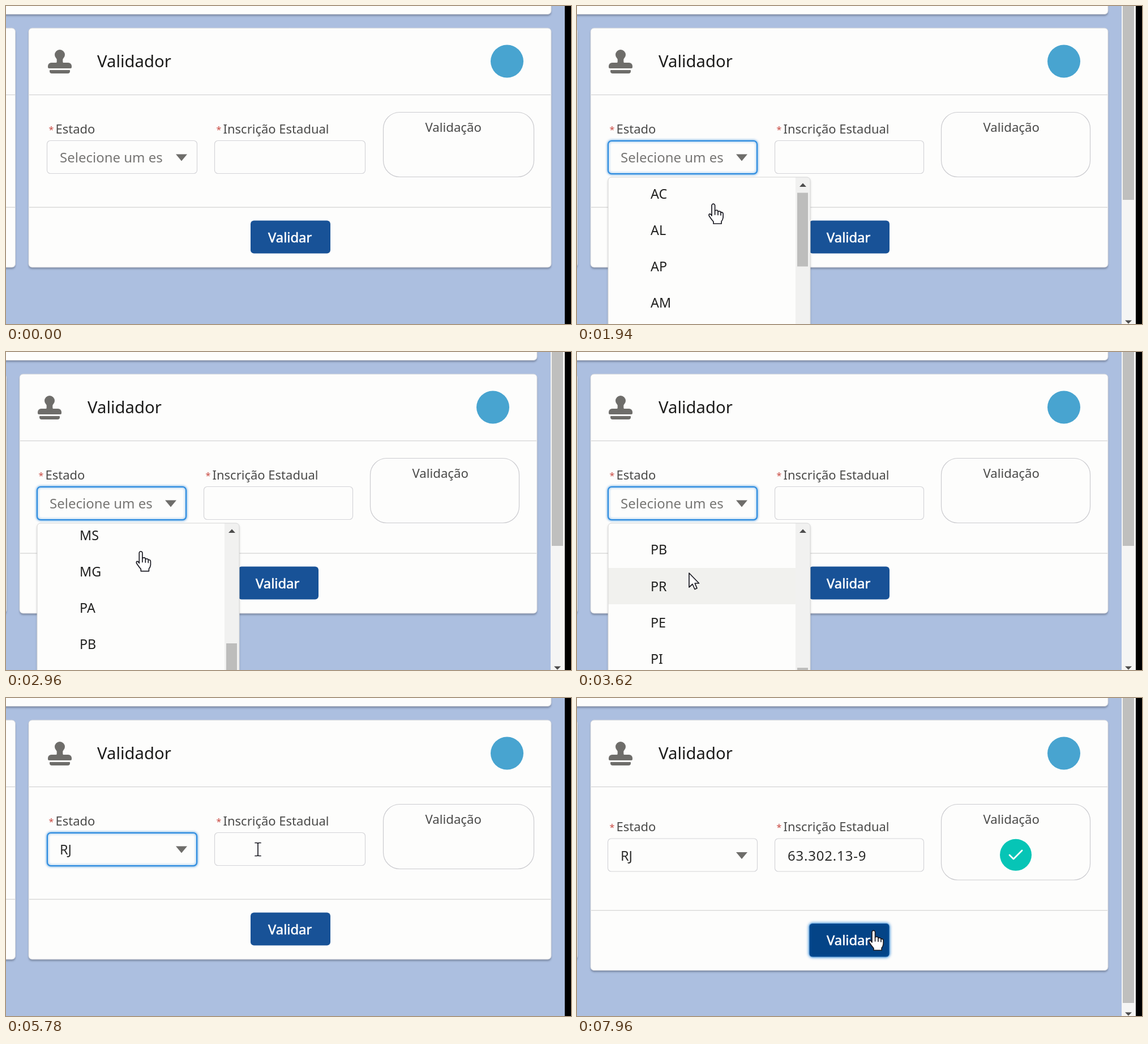
Write an HTML page with a canvas that moves like this. It is 998 by 561 pixels and loops after 8 s.

```html
<!DOCTYPE html>
<html lang="pt-BR">
<head>
<meta charset="utf-8">
<title>Validador</title>
<style>
  html, body { margin: 0; width: 100%; height: 100%; overflow: hidden; background: #acbfe0; }
  canvas { display: block; width: 100vw; height: 100vh; }
</style>
</head>
<body>
<canvas id="stage" width="998" height="561"></canvas>
<script>
const ctx = document.getElementById('stage').getContext('2d');
const W = 998, H = 561, LOOP = 8000;
const FONT = '"Noto Sans", "Open Sans", sans-serif';
const CARD = '#fdfdfc', GREY = '#6e6d6a', LINE = '#d6d6d6', BORDER = '#d4d4d8';

// Moments of the interaction, in ms
const FOCUS = 1400, OPEN = 1560, PICK = 5150, FOCUS_ID = 5950, PASTE = 6300, PRESS = 7150, RESULT = 7250;

const STATES = ('AC AL AP AM BA CE DF ES GO MA MT MS MG PA PB PR PE PI ' +
  'RJ RN RS RO RR SC SP SE TO').split(' ');
const ROW = 64.1, FIRST_ROW = 341;

const wide = { left: 40, right: 963, side: 16.5, icon: 95, title: 161, logo: 885,
  state: [72, 338], id: [368, 635], pill: [666, 933], button: [432, 573] };
const narrow = { left: 24, right: 938, side: 0.8, icon: 77, title: 144, logo: 860,
  state: [54, 319], id: [349, 613], pill: [643, 907], button: [410, 552] };

const MOUSE = [[900, 300, 600], [1300, 255, 272], [1650, 255, 272], [1900, 241, 349],
  [2900, 241, 349], [3300, 198, 390], [3750, 198, 390], [4300, 160, 338], [4800, 160, 338],
  [5000, 160, 326], [5200, 160, 326], [5700, 445, 267], [6700, 445, 267], [7050, 524, 410]];
const SCROLL = [[1920, 0], [2070, 181], [2110, 181], [2240, 362], [2265, 362], [2390, 542],
  [2800, 542], [2960, 723], [3100, 723], [3280, 889.5], [3900, 889.5], [4060, 1050],
  [4150, 1050], [4320, 1186]];

function track(keys, t, part) {
  if (t <= keys[0][0]) return keys[0][part];
  for (let i = 1; i < keys.length; i++) {
    const a = keys[i - 1], b = keys[i];
    if (t < b[0]) {
      const u = (t - a[0]) / (b[0] - a[0]);
      return a[part] + (b[part] - a[part]) * u * u * (3 - 2 * u);
    }
  }
  return keys[keys.length - 1][part];
}

function rect(x, y, w, h, color) {
  ctx.fillStyle = color;
  ctx.fillRect(x, y, w, h);
}

function box(x1, y1, x2, y2, r, fill, stroke, width = 1.2) {
  ctx.beginPath();
  ctx.roundRect(x1, y1, x2 - x1, y2 - y1, r);
  if (fill) { ctx.fillStyle = fill; ctx.fill(); }
  if (stroke) { ctx.strokeStyle = stroke; ctx.lineWidth = width; ctx.stroke(); }
}

function text(str, x, y, size, color) {
  ctx.font = `${size}px ${FONT}`;
  ctx.fillStyle = color;
  ctx.fillText(str, x, y);
}

function circle(x, y, r, color) {
  ctx.beginPath();
  ctx.arc(x, y, r, 0, Math.PI * 2);
  ctx.fillStyle = color;
  ctx.fill();
}

function shape(points, fill) {
  ctx.beginPath();
  points.forEach(([x, y]) => ctx.lineTo(x, y));
  ctx.closePath();
  ctx.fillStyle = fill;
  ctx.fill();
}

function withShadow(color, blur, dy, draw) {
  ctx.save();
  ctx.shadowColor = color;
  ctx.shadowBlur = blur;
  ctx.shadowOffsetY = dy;
  draw();
  ctx.restore();
}

function card(x1, y1, x2, y2) {
  withShadow('rgba(70,80,100,.45)', 3, 3, () => box(x1, y1, x2, y2, 6, CARD));
  box(x1, y1, x2, y2, 6, null, '#d3d5da', 1);
}

function stamp(x) {
  ctx.save();
  ctx.translate(x, 0);
  circle(0, 86, 9, GREY);
  ctx.beginPath();
  ctx.moveTo(-7, 90);
  ctx.quadraticCurveTo(-4, 95, -6, 101);
  ctx.lineTo(6, 101);
  ctx.quadraticCurveTo(4, 95, 7, 90);
  ctx.fill();
  box(-21, 100, 21, 110, [6, 6, 2, 2], GREY);
  box(-18, 113, 18, 119, [1, 1, 4, 4], GREY);
  ctx.restore();
}

function label(str, x, y) {
  text('*', x + 3.5, y - 1, 16, '#c94a42');
  text(str, x + 15.5, y, 22, '#4a4a49');
}

function field([x1, x2], y, focused) {
  if (focused) {
    withShadow('rgba(0,112,210,.7)', 4, 0, () => box(x1 + 1, y + 1, x2 - 1, y + 59, 6, CARD, '#2b8be0', 2));
  } else {
    box(x1 + .5, y + .5, x2 - .5, y + 58.5, 6, CARD, BORDER);
  }
}

function stateField(L, y, t) {
  const [x1, x2] = L.state, arrow = x2 - 28;
  field(L.state, y, t >= FOCUS && t < FOCUS_ID);
  ctx.save();
  ctx.beginPath();
  ctx.rect(x1, y, x2 - 61 - x1, 59);
  ctx.clip();
  if (t < PICK) text('Selecione um estado', x1 + 23, y + 39, 24, '#777674');
  else text('RJ', x1 + 23, y + 39, 23.5, '#2b2b2a');
  ctx.restore();
  shape([[arrow - 10, y + 24.5], [arrow + 10, y + 24.5], [arrow, y + 36.5]], GREY);
}

function idField(L, y, t) {
  field(L.id, y, t >= FOCUS_ID && t < PRESS);
  if (t < PASTE) return;
  ctx.letterSpacing = '0.8px';
  text('63.302.13-9', L.id[0] + 23, y + 39, 24, '#2b2b2a');
  ctx.letterSpacing = '0px';
}

function validation([x1, x2], grow, done) {
  box(x1 + .5, 187.5, x2 - .5, 301.5 + grow, 29, null, '#cbcbcf');
  text('Validação', x1 + 74.5, 222, 22.2, '#4a4a49');
  if (!done) return;
  const x = (x1 + x2) / 2;
  circle(x, 276.8, 28, '#06c5b6');
  ctx.beginPath();
  ctx.moveTo(x - 11, 277);
  ctx.lineTo(x - 4, 284);
  ctx.lineTo(x + 11, 269);
  ctx.strokeStyle = '#fff';
  ctx.lineWidth = 2.8;
  ctx.lineCap = ctx.lineJoin = 'round';
  ctx.stroke();
}

function button([x1, x2], y, hover, focused) {
  const fill = hover ? '#044487' : '#185297';
  if (focused) {
    withShadow('rgba(0,112,210,.8)', 5, 0, () => box(x1, y - .5, x2, y + 59, 6, fill, '#78aee0', 1));
  } else {
    box(x1, y, x2, y + 58, 6, fill);
  }
  text('Validar', x1 + 31, y + 38, 23.8, '#fff');
  ctx.strokeStyle = '#fff';
  ctx.lineWidth = .6;
  ctx.strokeText('Validar', x1 + 31, y + 38);
}

function list(t, mouseY) {
  const s = track(SCROLL, t, 1), moving = s !== track(SCROLL, t - 60, 1);
  withShadow('rgba(0,0,0,.2)', 4, 2, () => box(55, 302, 412, 640, 6, CARD));
  ctx.save();
  ctx.beginPath();
  ctx.roundRect(55, 302, 357, 340, 6);
  ctx.clip();
  STATES.forEach((name, i) => {
    const y = FIRST_ROW + ROW * i - s, top = y - ROW / 2;
    if (y < 260 || y > 600) return;
    const over = mouseY + 4 >= top && mouseY + 4 < top + ROW;
    if (over && !moving) rect(55, top, 331, ROW, '#f1f1ee');
    text(name, 130, y + 8.5, 23.3, '#1f1f1e');
  });
  rect(386, 302, 26, 340, '#f1f1f0');
  rect(389, 327 + s * .2586, 19, 130, '#bdbdbc');
  shape([[393, 319], [405, 319], [399, 312.5]], '#4c4c4c');
  ctx.restore();
  box(55, 302, 412, 640, 6, null, '#d8d8d8', 1);
}

function pageScrollbar(end) {
  rect(962, 0, 25, H, '#f5f5f4');
  rect(964, 0, 20, end, '#bfbfbe');
  shape([[968, 554.5], [980, 554.5], [974, 560.5]], '#4c4c4c');
}

const HAND = new Path2D('M-3 21V3a2.8 2.8 0 0 1 5.6 0V12q5-2 5.5 1.5q4.500-1 5 1.500q4-.5 4 3' +
  'V24q-.5 4-3 7V35H0V31.500Q-4 27-7.500 21.500C-9.500 17-5 16.500-3 21Z');
const FINGERS = new Path2D('M2.600 12V19M8 13.500V19.500M13 15V20');
const ARROW = new Path2D('M0 0V25L6 19.500L10 28.500L14 26.800L10.200 18H17.500Z');
const BEAM = new Path2D('M-5-11.500H-1.500L0-10.500L1.500-11.500H5M0-10.500V10.500M-5 11.500H-1.500L0 10.500L1.500 11.500H5');

function cursor(kind, x, y) {
  ctx.save();
  ctx.translate(x, y);
  ctx.lineJoin = ctx.lineCap = 'round';
  ctx.strokeStyle = '#1c1c24';
  ctx.lineWidth = 1.7;
  if (kind === 'beam') {
    ctx.stroke(BEAM);
  } else {
    const path = kind === 'hand' ? HAND : ARROW;
    ctx.fillStyle = '#fff';
    ctx.fill(path);
    ctx.stroke(path);
    if (kind === 'hand') ctx.stroke(FINGERS);
  }
  ctx.restore();
}

const inside = (x, y, [x1, x2], y1, y2) => x >= x1 && x <= x2 && y >= y1 && y <= y2;

function draw(t) {
  const open = t >= OPEN && t < PICK, done = t >= RESULT;
  const L = open || done ? narrow : wide;
  const grow = done ? 19.5 : 0;
  const fieldY = done ? 247.5 : 237, buttonY = 378.5 + grow;
  const x = track(MOUSE, t, 1), y = track(MOUSE, t, 2);
  const onButton = inside(x, y, L.button, buttonY, buttonY + 58);

  rect(0, 0, W, H, '#acbfe0');
  card(-20, -20, L.right, 14.5);
  card(-60, 39, L.side, 461);
  card(L.left, 39, L.right, 461 + grow);
  for (const [lineY, dy] of [[156, 0], [354.5, grow]]) {
    rect(0, lineY, L.side, 1.3, LINE);
    rect(L.left + 1, lineY + dy, L.right - L.left - 2, 1.3, LINE);
  }

  stamp(L.icon);
  text('Validador', L.title, 108, 29.3, '#1b1b1a');
  circle(L.logo, 97.5, 29, '#48a4d0');

  label('Estado', L.state[0], fieldY - 12.5);
  label('Inscrição Estadual', L.id[0], fieldY - 12.5);
  stateField(L, fieldY, t);
  idField(L, fieldY, t);
  validation(L.pill, grow, done);
  button(L.button, buttonY, onButton || t >= PRESS, t >= PRESS);

  if (open) list(t, y);
  if (open || done) pageScrollbar(done ? 538 : 342);
  rect(987, 0, 11, H, '#000');

  let kind = 'arrow';
  const resting = t > 3400 && t < 3750;
  if (onButton || t >= PRESS || (open && y > 302 && !resting)) kind = 'hand';
  else if ([L.state, L.id].some(f => inside(x, y, f, fieldY, fieldY + 59))) kind = 'beam';
  if (t >= MOUSE[0][0]) cursor(kind, x, y);
}

const start = performance.now();
function frame() {
  draw((performance.now() - start) % LOOP);
  requestAnimationFrame(frame);
}
frame();
</script>
</body>
</html>
```
